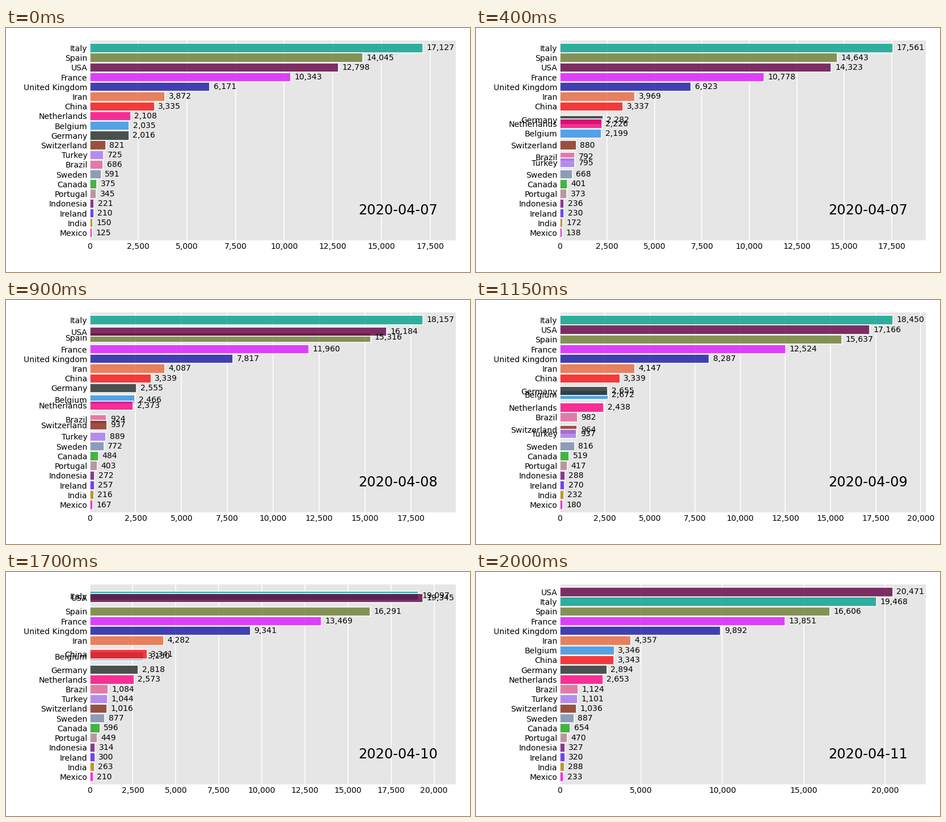
Animation of 818 by 432 pixels, one loop 2050 ms. Source, as a matplotlib script:

```python
import numpy as np
import matplotlib.pyplot as plt
from matplotlib.animation import FuncAnimation
from matplotlib.ticker import StrMethodFormatter

W, H, DPI = 818, 432, 144
LEFT, RIGHT, TOP, BOTTOM = 147.55, 793.48, 21.6, 376.3  # plot area, px
STEPS = 10  # frames per day
FONT = 7
FIRST_DAY = 7

# name: (colour, totals on five consecutive days); later rows paint on top
ROWS = {
    "Belgium": ("#2E91E5", 2035, 2240, 2523, 3019, 3346),
    "Brazil": ("#E15F99", 686, 819, 950, 1057, 1124),
    "Canada": ("#1CA71C", 375, 407, 503, 557, 654),
    "China": ("#FB0D0D", 3335, 3337, 3339, 3340, 3343),
    "France": ("#DA16FF", 10343, 10887, 12228, 13215, 13851),
    "Germany": ("#222A2A", 2016, 2349, 2607, 2767, 2894),
    "India": ("#B68100", 150, 178, 226, 246, 288),
    "Indonesia": ("#750D86", 221, 240, 280, 306, 327),
    "Iran": ("#EB663B", 3872, 3993, 4110, 4232, 4357),
    "Ireland": ("#511CFB", 210, 235, 263, 287, 320),
    "Italy": ("#00A08B", 17127, 17669, 18279, 18849, 19468),
    "Mexico": ("#FB00D1", 125, 141, 174, 194, 233),
    "Netherlands": ("#FC0080", 2108, 2255, 2403, 2520, 2653),
    "Portugal": ("#B2828D", 345, 380, 409, 435, 470),
    "Spain": ("#6C7C32", 14045, 14792, 15447, 16081, 16606),
    "Sweden": ("#778AAE", 591, 687, 793, 870, 887),
    "Switzerland": ("#862A16", 821, 895, 948, 1002, 1036),
    "Turkey": ("#A777F1", 725, 812, 908, 1006, 1101),
    "USA": ("#620042", 12798, 14704, 16554, 18595, 20471),
    "United Kingdom": ("#1616A7", 6171, 7111, 7993, 8974, 9892),
}
names = list(ROWS)
colors = [row[0] for row in ROWS.values()]
totals = np.array([row[1:] for row in ROWS.values()], float)
ranks = totals.argsort(axis=0).argsort(axis=0) + 1
n_bars, n_days = totals.shape
n_frames = (n_days - 1) * STEPS + 1


def blend(table, i):
    """Linear in-between of the daily columns at frame i."""
    day, step = divmod(i, STEPS)
    nxt = min(day + 1, n_days - 1)
    return (table[:, day] * (STEPS - step) + table[:, nxt] * step) / STEPS


plt.rcParams["font.family"] = "DejaVu Sans"
fig = plt.figure(figsize=(W / DPI, H / DPI), dpi=DPI, facecolor="white")
ax = fig.add_axes([LEFT / W, 1 - BOTTOM / H, (RIGHT - LEFT) / W,
                   (BOTTOM - TOP) / H], facecolor="0.9")
ax.set_ylim(0.2, n_bars + 0.8)
ax.grid(True, axis="x", color="white", linewidth=0.8)
ax.set_axisbelow(True)
ax.xaxis.set_major_formatter(StrMethodFormatter("{x:,.0f}"))
ax.tick_params(length=0, labelsize=FONT, pad=2)
ax.spines[:].set_visible(False)

bars = ax.barh(ranks[:, 0], totals[:, 0], height=0.95, color=colors,
               ec="white", linewidth=1, alpha=0.8)
labels = [ax.text(0, 0, "", ha="left", va="center", size=FONT) for _ in names]
date = ax.text(0.95, 0.15, "", transform=ax.transAxes,
               ha="right", va="center", size=12)


def draw(i):
    values, places = blend(totals, i), blend(ranks, i)
    xmax = values.max() * 1.1
    ax.set_xlim(0, xmax)
    ax.set_yticks(places, names)
    for bar, label, v, y in zip(bars, labels, values, places):
        bar.set_width(v)
        bar.set_y(y - bar.get_height() / 2)
        label.set_position((v + 0.01 * xmax, y))
        label.set_text(f"{v:,.0f}")
    date.set_text(f"2020-04-{FIRST_DAY + i // STEPS:02d}")
    return [*bars, *labels, date]


anim = FuncAnimation(fig, draw, frames=n_frames, interval=50, repeat=True,
                     repeat_delay=0, blit=False)
plt.show()
```
